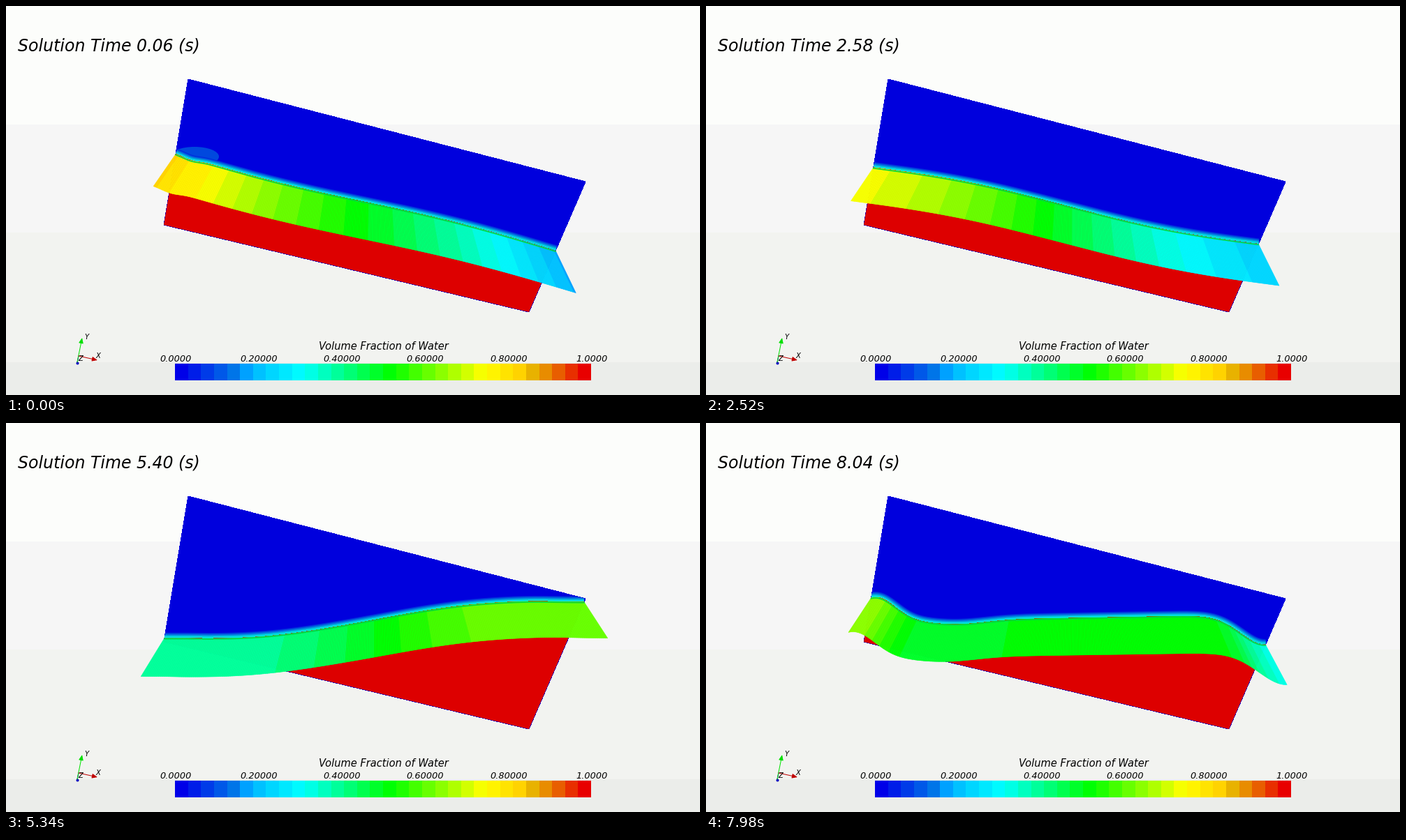
Animation, 994 px wide and 558 px high, one loop 8 s. Source, as a matplotlib script:

```python
import colorsys
import numpy as np
import matplotlib.pyplot as plt
from matplotlib.animation import FuncAnimation
from matplotlib.collections import PolyCollection
from matplotlib.patches import Ellipse, Polygon, Rectangle

W, H, DPI = 994, 558, 100
TANK = np.array([(261, 105), (830, 252), (749, 439), (226, 314)], float)
TOP_SLOPE, FLOOR_SLOPE = 147 / 569, 125 / 523
LEVELS = 32
S = np.linspace(0, 1, 241)      # position across the tank


def pose(left, right, swell=0, *bumps):
    """Tilted water line with one sine swell and bumps (centre, width, depth)."""
    y = left + (right - left) * S + swell * np.sin(2 * np.pi * S)
    for centre, width, depth in bumps:
        y = y + depth * np.exp(-((S - centre) / width) ** 2)
    return y


rest = pose(212, 351, 4, (.04, .03, 3))
step_up = pose(305, 256, 27, (.1, .1, -6), (.42, .09, 13), (.88, .08, 5))
splash = pose(262, 300, 10, (0, .02, 55), (.9, .06, 11), (1, .025, -49))
rebound = pose(254, 299, -23, (.05, .03, 15), (.36, .1, 11),
               (.87, .06, 8), (.95, .04, -12))
low_step = pose(294, 265, 14, (.1, .07, 6), (.4, .1, 6))
roof_hit = pose(290, 266, 0, (0, .04, 30), (.33, .1, 8), (.57, .06, -5),
                (.82, .1, 7), (1, .04, -20))
fall = pose(285, 275, 0, (.01, .07, -35), (.22, .1, 6), (1, .09, 43))

KEYS = [
    (0, rest), (.84, pose(268, 285, 12)), (1.3, pose(303, 253, 33)),
    (1.68, step_up), (2.55, pose(232, 341, -6)), (3.0, pose(262, 302)),
    (3.42, splash), (3.95, (fall + rebound) / 2), (4.56, rebound),
    (5.0, pose(282, 275)), (5.45, pose(314, 253, 12)), (6.12, low_step),
    (6.7, pose(262, 322, -4)), (7.38, roof_hit), (7.98, fall),
]
KEY_T = np.array([t for t, _ in KEYS])
KEY_Y = np.array([y for _, y in KEYS])
KEY_V = np.gradient(KEY_Y, KEY_T, axis=0)


def heights(t):
    """Cubic Hermite easing between the poses."""
    i = np.clip(np.searchsorted(KEY_T, t, side="right") - 1, 0, len(KEYS) - 2)
    h = KEY_T[i + 1] - KEY_T[i]
    u = (t - KEY_T[i]) / h
    return ((1 + 2 * u) * (1 - u) ** 2 * KEY_Y[i] + u * (1 - u) ** 2 * h * KEY_V[i]
            + u * u * (3 - 2 * u) * KEY_Y[i + 1] + u * u * (u - 1) * h * KEY_V[i + 1])


def right_wall(y):
    return 830 - 81 * (y - 252) / 187


def surface(t):
    """Water line on the rear plane; its ends run along walls, floor and roof."""
    y = heights(t)
    a, b = min(y[0], 321), max(y[-1], 245)
    x0 = 226 + (a - 314) / FLOOR_SLOPE if a > 314 else 226 + 35 * (314 - a) / 209
    x1 = 830 - (252 - b) / TOP_SLOPE if b < 252 else right_wall(b)
    x = x0 + (x1 - x0) * S
    roof = 105 + (x - 261) * TOP_SLOPE
    floor = 314 + (x - 226) * FLOOR_SLOPE
    return x, np.clip(y, roof, floor)


def toward_viewer(x, y):
    return x + (x - 527) * .112, y + 46 + .093 * (y - 212) + .003 * (x - 243)


def rainbow(level):
    v = level / (LEVELS - 1)
    hue = np.interp(v, [0, .2, .3, .52, .75, .88, 1], [240, 193, 180, 120, 60, 45, 0])
    return colorsys.hsv_to_rgb(hue / 360, 1, 1 if .15 < v < .86 else .91)


PALETTE = np.array([rainbow(k) for k in range(LEVELS)])


def strip_colors(x, y):
    value = .512 - .0046 * ((y[1:] + y[:-1]) / 2 - 280)
    level = np.clip(value * LEVELS, 0, LEVELS - 1).astype(int)
    slope = np.diff(y) / np.diff(x)
    darkest = np.where(x[1:] < 400, .6, .33)
    shade = np.clip(1 + .9 * (slope + .2), darkest, 1)
    return PALETTE[level] * shade[:, None]


def px(n):
    return n * 72 / DPI


fig = plt.figure(figsize=(W / DPI, H / DPI), dpi=DPI)
ax = fig.add_axes([0, 0, 1, 1])
ax.set_xlim(0, W)
ax.set_ylim(H, 0)
ax.axis("off")

for top, color in [(0, "#fcfdfb"), (170, "#f6f6f6"), (325, "#f2f3f0"),
                   (511, "#ebedea")]:
    ax.add_patch(Rectangle((0, top), W, H - top, fc=color, lw=0, aa=False))


def label(x, y, text, size, ha="center"):
    return ax.text(x, y, text, fontsize=px(size), ha=ha, va="baseline",
                   family="DejaVu Sans", style="italic", color="black", zorder=9)


# Colour bar
cell = 596 / LEVELS
for i, color in enumerate(PALETTE):
    ax.add_patch(Rectangle((242 + i * cell, 513), cell, 24, fc=color, lw=0, aa=False))
label(541, 493, "Volume Fraction of Water", 14.6)
for i in range(6):
    digits = 5 if 0 < i < 5 else 4
    label(243 + 119.2 * i, 510, f"{i / 5:.{digits}f}", 12.9)

# Axis triad
for tail, tip, color in [((102, 511), (109, 476), "#00e000"),
                         ((104, 502), (131, 508), "#c00000")]:
    ax.annotate("", tip, tail, arrowprops=dict(
        arrowstyle="-|>,head_length=0.35,head_width=0.15", color=color,
        lw=px(1), shrinkA=0, shrinkB=0, mutation_scale=13))
ax.plot([102, 104], [511, 502], color="#0000c0", lw=px(1))
ax.plot([102], [511.5], "o", color="#0000c0", ms=px(4), mew=0)
for x, y, name in [(115, 478, "Y"), (132, 505, "X"), (107, 509, "Z")]:
    label(x, y, name, 10)

tank = Polygon(TANK, fc="#0000dd", lw=0, aa=False, zorder=2)
ax.add_patch(tank)


def in_tank(artist):
    artist.set_clip_path(tank)
    return artist


# Faint spray that comes and goes: time, centre, width, height
sprays = []
for when, x, y, w, h in [(0, 270, 216, 70, 28), (4.56, 267, 243, 38, 50),
                         (6.12, 292, 293, 118, 26)]:
    mist = Ellipse((x, y), w, h, fc="#0048de", lw=0, zorder=2.2)
    ax.add_patch(mist)
    sprays.append((when, in_tank(mist)))

# Blue to cyan blur above the water line
halos = []
for u in np.linspace(0, 1, 6):
    line, = ax.plot([], [], color=(0, .16 + .72 * u, .87), lw=px(16 - 11 * u),
                    zorder=2.4 + u / 2, solid_capstyle="butt")
    halos.append(in_tank(line))

water = Polygon(TANK[:3], fc="#dd0000", lw=0, aa=False, zorder=3)
ax.add_patch(water)
in_tank(water)
sheet = PolyCollection([], lw=px(.6), zorder=4)
ax.add_collection(sheet)
crest, = ax.plot([], [], color="#00d840", lw=px(1.6), zorder=5)
clock = label(17, 64, "", 23.6, ha="left")


def draw(i):
    n = (2 * i + 1) // 3          # the picture changes every 60 ms
    t = n * .06
    x, y = surface(t)
    back = np.column_stack([x, y])
    front = np.column_stack(toward_viewer(x, y))

    wall_y = max(y[-1], 254)
    water.set_xy(np.vstack([back, [(right_wall(wall_y), wall_y)], TANK[2:]]))
    for line in halos:
        line.set_data(x, y)

    colors = strip_colors(x, y)
    sheet.set_verts(np.stack([back[:-1], back[1:], front[1:], front[:-1]], axis=1))
    sheet.set_facecolor(colors)
    sheet.set_edgecolor(colors)
    crest.set_data(x, y + 1)

    for when, mist in sprays:
        mist.set_alpha(max(0, 1 - abs(t - when) / .5))
    clock.set_text(f"Solution Time {t + .06:.2f} (s)")
    return [water, sheet, crest, clock]


anim = FuncAnimation(fig, draw, frames=200, interval=40, repeat=True,
                     repeat_delay=0, blit=False)
plt.show()
```
